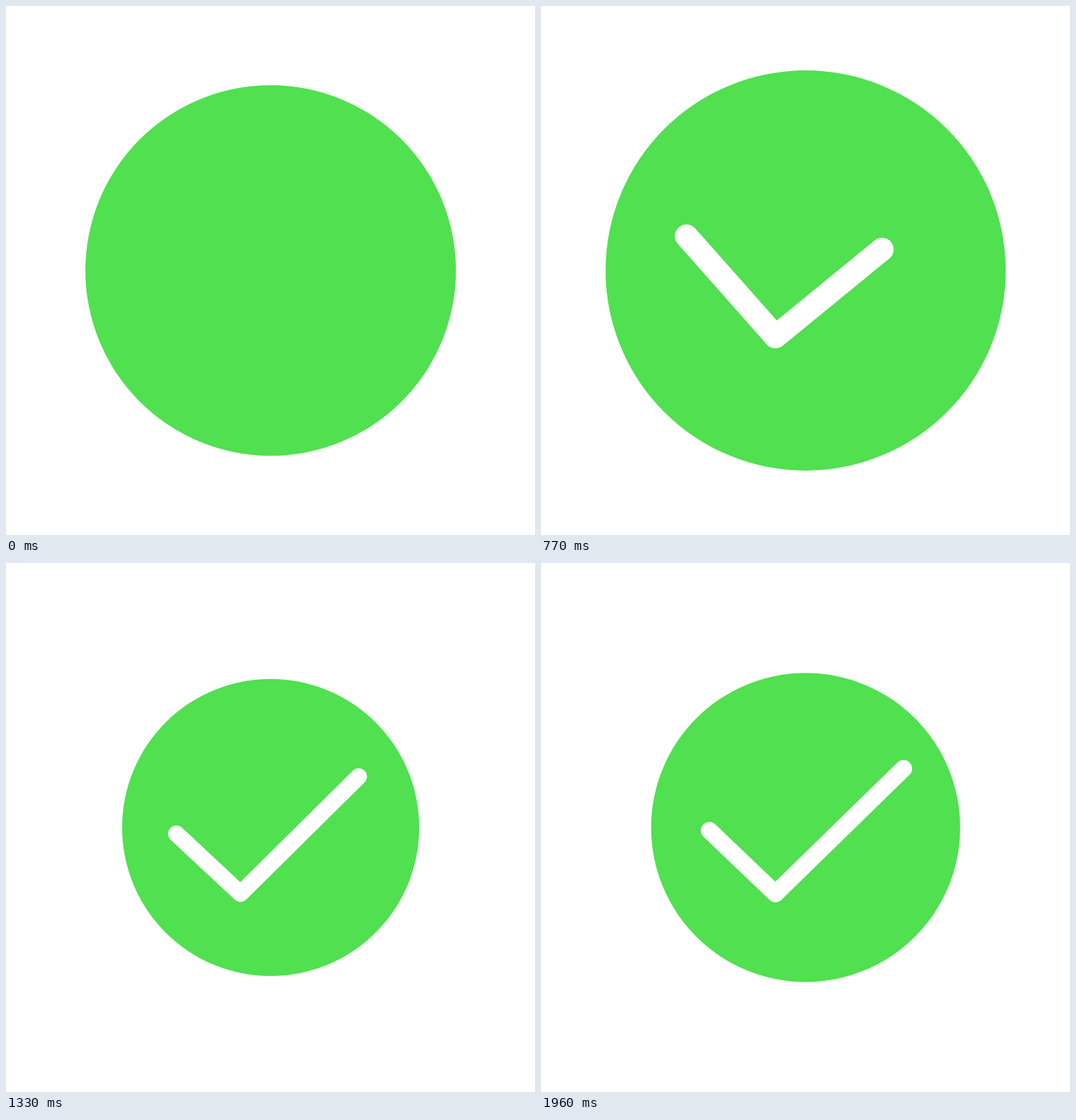
Animation, 748 px wide and 748 px high, one loop 2030 ms. Source, as an HTML page:

```html
<!DOCTYPE html>
<html lang="en">
<head>
<meta charset="utf-8">
<title>Check mark</title>
<style>
  html, body { margin: 0; width: 100%; height: 100%; overflow: hidden; background: #fff; }
  svg { display: block; width: 100%; height: 100%; }
</style>
</head>
<body>
<svg viewBox="0 0 748 748">
  <g id="rays" stroke="#50e050" stroke-width="10"></g>
  <circle id="disc" cx="374.2" cy="374" fill="#50e050"/>
  <path id="check" fill="none" stroke="#fff" stroke-linecap="round" stroke-linejoin="round"/>
</svg>
<script>
const LOOP = 2030, STEP = 70, POSE = 420, START = 490;
const CORNER = { x: 331.5, y: 467.5 };
const RAYS = 12;

const $ = id => document.getElementById(id);
const setAll = (node, attrs) => {
  for (const name in attrs) node.setAttribute(name, attrs[name]);
};
const lerp = (a, b, u) => a + (b - a) * u;
const span = (t, from, to) => Math.min(1, Math.max(0, (t - from) / (to - from)));
const easeOut = (u, power) => 1 - (1 - u) ** power;
const smooth = u => u * u * (3 - 2 * u);

const rays = Array.from({ length: RAYS }, (_, i) => {
  const line = document.createElementNS("http://www.w3.org/2000/svg", "line");
  setAll(line, { transform: `translate(374.2 374.2) rotate(${i * 360 / RAYS})` });
  return $("rays").appendChild(line);
});

// The short arm is drawn first; the rest of the length goes up the long arm.
function checkPath(squash, length) {
  const x = lerp(200, 241, squash), y = lerp(316, 383, squash);
  const dx = CORNER.x - x, dy = CORNER.y - y;
  const short = Math.min(length, 1);
  let d = `M${x} ${y}l${dx * short} ${dy * short}`;
  if (length > 1) {
    const long = Math.hypot(dx, dy) * (length - 1);
    const angle = Math.atan(lerp(0.79, 0.99, squash));
    d += `l${long * Math.cos(angle)} ${-long * Math.sin(angle)}`;
  }
  return d;
}

function render(time) {
  const now = Math.floor((time % LOOP) / STEP) * STEP;
  const t = now < START ? POSE : now;

  // The disc swells, shrinks past its resting size, then relaxes.
  const pop = easeOut(span(t, 420, 620), 3);
  const settle = easeOut(span(t, 620, 1300) ** 2, 4);
  const relax = smooth(span(t, 1300, 1960));
  $("disc").setAttribute("r", lerp(262, 299, pop) - 89 * settle + 8.5 * relax);

  // The mark flattens whenever the disc is small.
  const squash = 1 - pop + settle ** 1.15 - 0.07 * relax;
  const length = 2.96 * easeOut(span(t, 455, 2420), 6.6);
  setAll($("check"), {
    d: length > 0 ? checkPath(squash, length) : "",
    "stroke-width": lerp(34.5, 23.5, squash)
  });

  // The outer ends run ahead and the inner ends catch up.
  const burst = span(t, 770, 1060);
  const x1 = lerp(270, 372, easeOut(burst, 1.25));
  const x2 = lerp(270, 372, easeOut(burst, 5));
  for (const ray of rays) setAll(ray, { x1, x2 });
}

const begin = performance.now();
function tick() {
  render(performance.now() - begin);
  requestAnimationFrame(tick);
}
tick();
</script>
</body>
</html>
```
